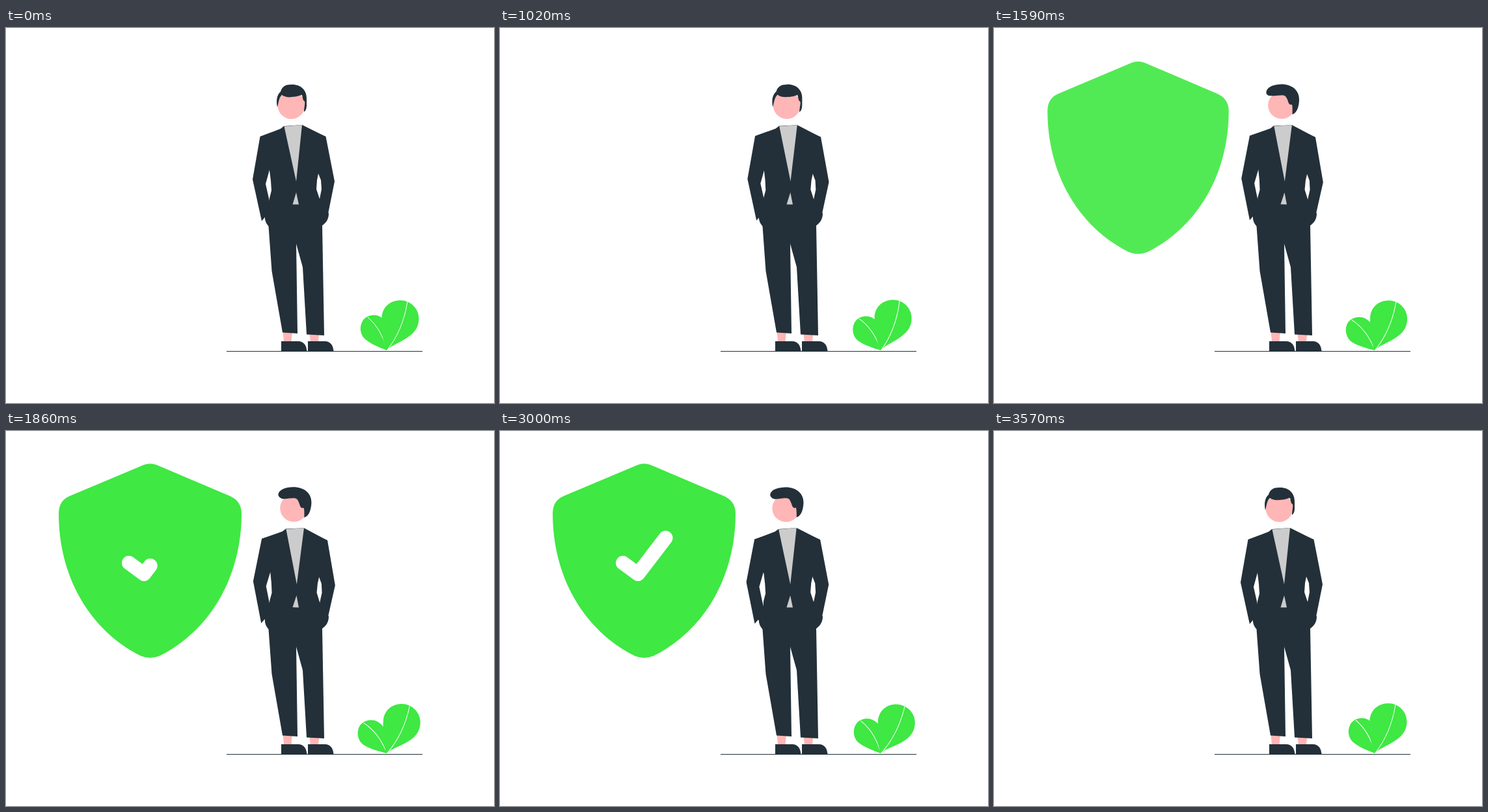
An HTML page that plays this animation: 750 px wide and 577 px high, repeating every 3600 ms.

```html
<!DOCTYPE html>
<html lang="en">
<head>
<meta charset="utf-8">
<title>Protected</title>
<style>
  html, body { margin: 0; width: 100%; height: 100%; overflow: hidden; background: #fff; }
  svg { display: block; width: 750px; height: 577px; }
  .dark { fill: #233039; }
  .skin { fill: #ffb6b6; }
  .shirt { fill: #ccc; }
  .green { fill: #3fe843; }
  .vein { fill: none; stroke: #fff; stroke-width: 1; }
</style>
</head>
<body>
<svg viewBox="0 0 750 577">
  <g id="shield">
    <path class="green" d="M212 52Q221.500 48.500 231 52L344 100Q362 108 362 127C362 222 316 306 236 346Q221.500 352 207 346C127 306 81 222 81 127Q81 107 98 100Z"/>
    <path id="check" d="M189 203L212 220L254.500 164.500" pathLength="100" fill="none" stroke="#fff" stroke-width="22" stroke-linecap="round" stroke-linejoin="round"/>
  </g>

  <rect class="dark" x="339" y="497" width="301" height="1"/>

  <path class="skin" d="M425.500 466L440 466L438.500 483H427ZM466 468L481.500 468L480 483H468Z"/>
  <path class="dark" d="M423 482H449C458 482 462 489 462.500 497.500H423ZM464 482H490C499 482 503 489 503.500 497.500H464Z"/>
  <path class="dark" d="M404 276L398 288C397 297 401 302 403.500 305L408.500 374L425 468.500L448 470L446 332L456 368L462 471.500L489 473L486 304C493 299 496 293 496 285L486 276Z"/>

  <g id="body">
    <path class="dark" d="M427 151L422 155L391 167L405 219L407 235L408 250L405 262L404 292H486L482 263L477 248L478 234L480 224L491 167L455 149Z"/>
    <path class="dark" d="M475 160L491.500 167L505 236L495 286L478 296L482 263L485 248L484 234L480 224L470 200Z"/>
    <path id="arm" class="dark" d="M410 160L390.500 167L379 233L393 297L398 291L412 294L404 262L399 240L405 218L415 200Z"/>
    <path class="shirt" d="M427.500 151.500L455 149L446 236ZM446 253L440.500 271.500H450Z"/>
    <circle class="skin" cx="438.500" cy="119" r="21"/>
    <path id="hair" class="dark"/>
  </g>

  <g id="smallLeaf">
    <path class="green" d="M585 496C573 491 560 486 551 478C543 470 543 456 550 448C558 440 571 440 579 447C591 457 589 475 585 496Z"/>
    <path class="vein" d="M556 445Q576 462 584 491"/>
  </g>
  <g id="bigLeaf">
    <path class="green" d="M585 496C578 480 577.500 465 577.500 447C577.500 430 590 419 606 419C622 419 634.500 432 634.500 447C634.500 460 628 468 620 474C607 484 592 488 585 496Z"/>
    <path class="vein" d="M617 421Q610 465 585.500 496"/>
  </g>
</svg>
<script>
const LOOP = 3600;
const el = id => document.getElementById(id);
const set = (id, name, value) => el(id).setAttribute(name, value);
const spin = (id, angle, x, y) => set(id, 'transform', `rotate(${angle} ${x} ${y})`);

const progress = (t, start, end) => Math.min(1, Math.max(0, (t - start) / (end - start)));
const easeOut = p => 1 - (1 - p) ** 2;
const easeInOut = p => (1 - Math.cos(Math.PI * p)) / 2;
const ramp = (t, start, end) => easeInOut(progress(t, start, end));

const hairFront = 'M417 122C415 112 416 103 422 98C424 90 430 87 438 87C452 86 463 95 462 110C462 119 463 126 458 129C458 123 460 117 459 113C457 112 456 109 455 103C452 103 448 106 440 106C434 107 428 106 424 103C419 108 419 115 417 122Z';
const hairSide = 'M415 101C413 98 415 94 419 91C424 88 430 87 437 86.5C453 86 466 95 465.5 111C465 120 463 130 455 133C455 127 455 122 454 118C450 119 449 118 447 112C445 107 444 104 440 103.5C434 103 428 105 422 105C419 105 416 103 415 101Z';
const sideNumbers = hairSide.match(/[\d.]+/g);

function blendHair(p) {
  let i = 0;
  return hairFront.replace(/[\d.]+/g, n => +n + (sideNumbers[i++] - n) * p);
}

function draw(t) {
  const phase = 2 * Math.PI * t / LOOP;
  const sway = (1 - Math.cos(phase)) / 2;

  spin('body', 1.4 * sway, 446, 272);
  spin('arm', -0.7 * Math.sin(phase), 398, 167);
  set('hair', 'd', blendHair(ramp(t, 1100, 1700) - ramp(t, 3150, 3560)));

  spin('smallLeaf', -7.5 * sway, 585, 496);
  spin('bigLeaf', -2.4 * ramp(t, 0, 840) + 8.3 * ramp(t, 840, 2620) - 5.9 * ramp(t, 2620, LOOP), 585, 496);

  const shown = Math.min(progress(t, 1120, 1640), 1 - progress(t, 3260, 3560));
  set('shield', 'opacity', shown);
  set('shield', 'transform', `translate(221.5 200) scale(${easeOut(shown)}) translate(-221.5 -200)`);

  const drawn = 100 * easeOut(progress(t, 1650, 2460));
  set('check', 'stroke-dasharray', `${drawn} 200`);
  set('check', 'visibility', drawn > 0 ? 'inherit' : 'hidden');
}

const begin = performance.now();
function tick() {
  draw((performance.now() - begin) % LOOP);
  requestAnimationFrame(tick);
}
tick();
</script>
</body>
</html>
```
